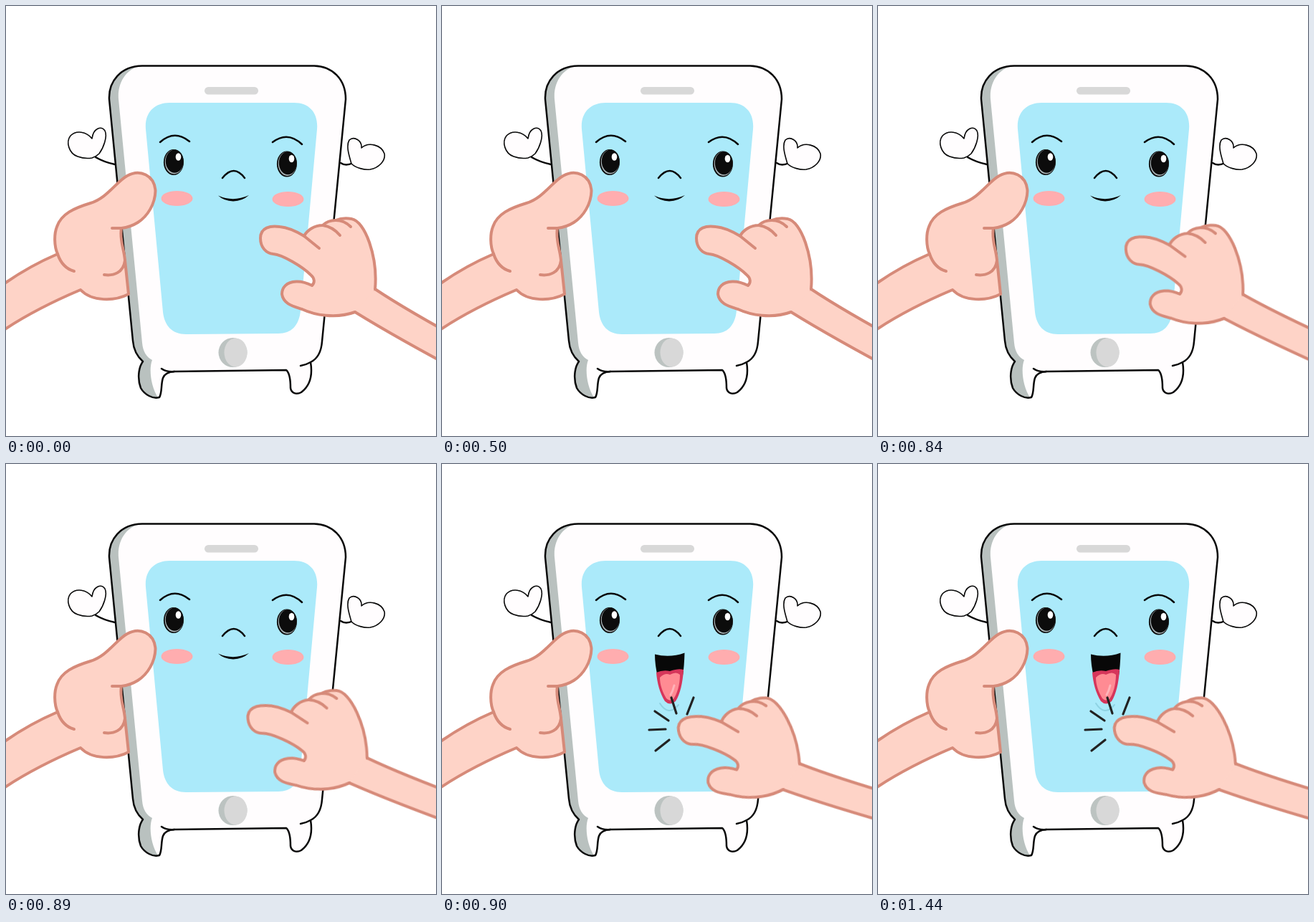
An HTML page that plays this animation: 600x600 px, repeating every 1.8 s.

```html
<!DOCTYPE html>
<html lang="en">
<head>
<meta charset="utf-8">
<title>Happy phone</title>
<style>
  html, body { margin: 0; width: 100%; height: 100%; overflow: hidden; background: #fff; }
  svg { display: block; width: 100vw; height: 100vh; }
  .ink { fill: none; stroke: #080808; stroke-width: 2.5; stroke-linecap: round; stroke-linejoin: round; }
  .skin { fill: #fed3c7; stroke: #d68a79; stroke-width: 4; stroke-linecap: round; stroke-linejoin: round; }
  .crease { fill: none; }
  #hand { transform-origin: 662px 514px; }
  #arm { transform-origin: 501px 411px; }
  #happy { opacity: 0; }
</style>
</head>
<body>
<svg viewBox="0 0 600 600">
  <defs>
    <path id="body" d="M190 83.500L430 83.500C455 84 474 102 474 130L441 468C440 482 435 492 425 497C428 515 424 530 412 539C405 543 398 540 397 533C397 523 396 512 391 508L235 510Q222 511 219 519C216 528 218 540 214 546C205 549 193 542 188 533C183 520 185 504 191 496C183 489 178 480 177 467L144 130C143 105 160 84 190 83.500Z"/>
    <clipPath id="inside"><use href="#body"/></clipPath>
    <g id="eye" fill="#0c0c0c">
      <ellipse cx="-.6" cy="1" rx="14" ry="18"/>
      <ellipse cx="0" cy=".6" rx="12.8" ry="16.8" fill="#a9b4b7"/>
      <ellipse cx=".8" cy="-.4" rx="12.5" ry="16.2"/>
      <ellipse cx="6" cy="-6.500" rx="3.800" ry="5.200" fill="#fff"/>
    </g>
  </defs>

  <!-- Small heart-shaped hands -->
  <g class="ink">
    <path d="M125 211Q137 218 152 221M467 219Q474 224 484 219"/>
    <g fill="#fffdfe" stroke-width="1.6">
      <path d="M120 185C112 175 98 173 90 181C83 190 88 206 100 210C108 213 114 213 120 212Q126 210 130 206C136 198 142 182 138 174C133 167 122 170 120 185Z"/>
      <path d="M496 198C497 188 486 181 479 187C474 195 479 210 482 220C488 226 500 229 508 228C520 226 530 216 528 206C524 194 506 189 496 198Z"/>
    </g>
  </g>

  <!-- Phone -->
  <use href="#body" fill="#b9c1bf"/>
  <path clip-path="url(#inside)" fill="#fffdfe" d="M190 83C170 86 155 105 157 130L190 470C191 482 196 490 204 494C199 506 202 532 213 548L220 560H480V60H190Z"/>
  <use href="#body" class="ink"/>
  <path class="ink" d="M425 497Q418 501 411 502M217 506Q224 511 235 510"/>
  <path fill="#abeafa" d="M195 172C193 148 208 135 228 135H402C424 135 436 150 434 172L411 425C409 446 398 457 380 457L251 458C232 458 221 446 219 427Z"/>
  <rect x="277" y="113" width="75" height="10.5" rx="5.2" fill="#d8d8d8"/>
  <ellipse cx="316.5" cy="483.5" rx="20" ry="20.5" fill="#bcc3c1"/>
  <ellipse cx="320.5" cy="483.5" rx="16" ry="20" fill="#d8d8d8"/>

  <!-- Face -->
  <path class="ink" d="M215 190Q235 172 256 189M372 190Q393 174 413 193M302 240Q318 220 333 240"/>
  <use href="#eye" x="234.500" y="217"/>
  <use href="#eye" x="392.500" y="219.500"/>
  <g fill="#ffadaf">
    <ellipse cx="238.5" cy="268.5" rx="22" ry="10.5"/>
    <ellipse cx="393.5" cy="269.5" rx="22" ry="10.5"/>
  </g>
  <path id="smile" fill="#080808" d="M296 264.500Q317 274 339 264Q330 272 317 272.500Q304 272 296 264.500Z"/>

  <g id="happy">
    <path fill="none" stroke="#8fd3e3" stroke-width="2" stroke-linecap="round" d="M304 334Q316 353 330 336"/>
    <path fill="#080808" d="M297 265.500Q318 271 338.500 263.500Q338 282 336 295L301 297Q297 280 297 265.500Z"/>
    <path fill="#d6365b" d="M299 291Q308 287 318 289Q330 285 337 287C336 305 332 322 326 331Q318 338 311 331C304 320 300 305 299 291Z"/>
    <path fill="#ff8b93" d="M304 298Q311 291 318 294Q327 289 332 294C332 308 328 321 323 328Q318 332 313 327C308 319 304 308 304 298Z"/>
    <path fill="none" stroke="#ffb3b8" stroke-width="3" stroke-linecap="round" d="M324 309Q322 317 319 322"/>
    <path fill="none" stroke="#222" stroke-width="3.2" stroke-linecap="round" d="M320 326L327 348M351 326L342 349M297 345L316 358M289 371L312 370M298 400L317 385"/>
  </g>

  <!-- Holding hand -->
  <g class="skin">
    <path d="M-6 390Q30 364 72 346C67 335 67 318 71 308C77 290 95 282 118 275C141 268 153 246 169 237C187 227 207 236 208.500 258C208 276 198 293 184 302C176 307 170 309 161 310C158 326 165 340 166 355L171 402C152 412 120 413 104 396Q40 423 -6 454Z"/>
    <path class="crease" d="M72 346C76 358 84 367 95 370M161 310L148 310M137 375C150 377 164 372 166 355"/>
  </g>

  <!-- Tapping hand -->
  <g id="hand" class="skin">
    <path id="arm" d="M470 400L515 395Q560 425 645 471V516Q545 463 487 427Z"/>
    <path d="M515 395C519 350 501 300 482 297Q470 295 460 299Q449 299 442 306C430 306 420 313 416 321C406 315 395 309 382 308C369 306 355 309 355 324C355 337 363 345 373 346C386 347 414 364 425 375C431 380 431 386 427 390Q415 384 405 384.500C391 385 385 393 385 402C387 416 401 419 413 423C430 431 460 437 487 427"/>
    <path class="crease" d="M416 321L437 338M442 306Q456 308 466 320M460 299Q472 299 481 308"/>
  </g>
</svg>
<script>
  const LOOP = 1800;
  const TIMES = [0, 840, 870, 900, LOOP];

  // Holds each value until the next time in the table.
  function play(id, values) {
    const frames = TIMES.map((time, i) => ({
      offset: time / LOOP,
      easing: 'step-end',
      ...values[Math.min(i, values.length - 1)]
    }));
    document.getElementById(id).animate(frames, { duration: LOOP, iterations: Infinity });
  }

  const turn = total => [0, 1, 2, 3].map(n => ({ transform: `rotate(${total * n / 3}deg)` }));
  const show = list => list.map(opacity => ({ opacity }));

  play('hand', turn(-8.6));
  play('arm', turn(-3.6));
  play('smile', show([1, 1, 1, 0]));
  play('happy', show([0, 0, 0, 1]));
</script>
</body>
</html>
```
